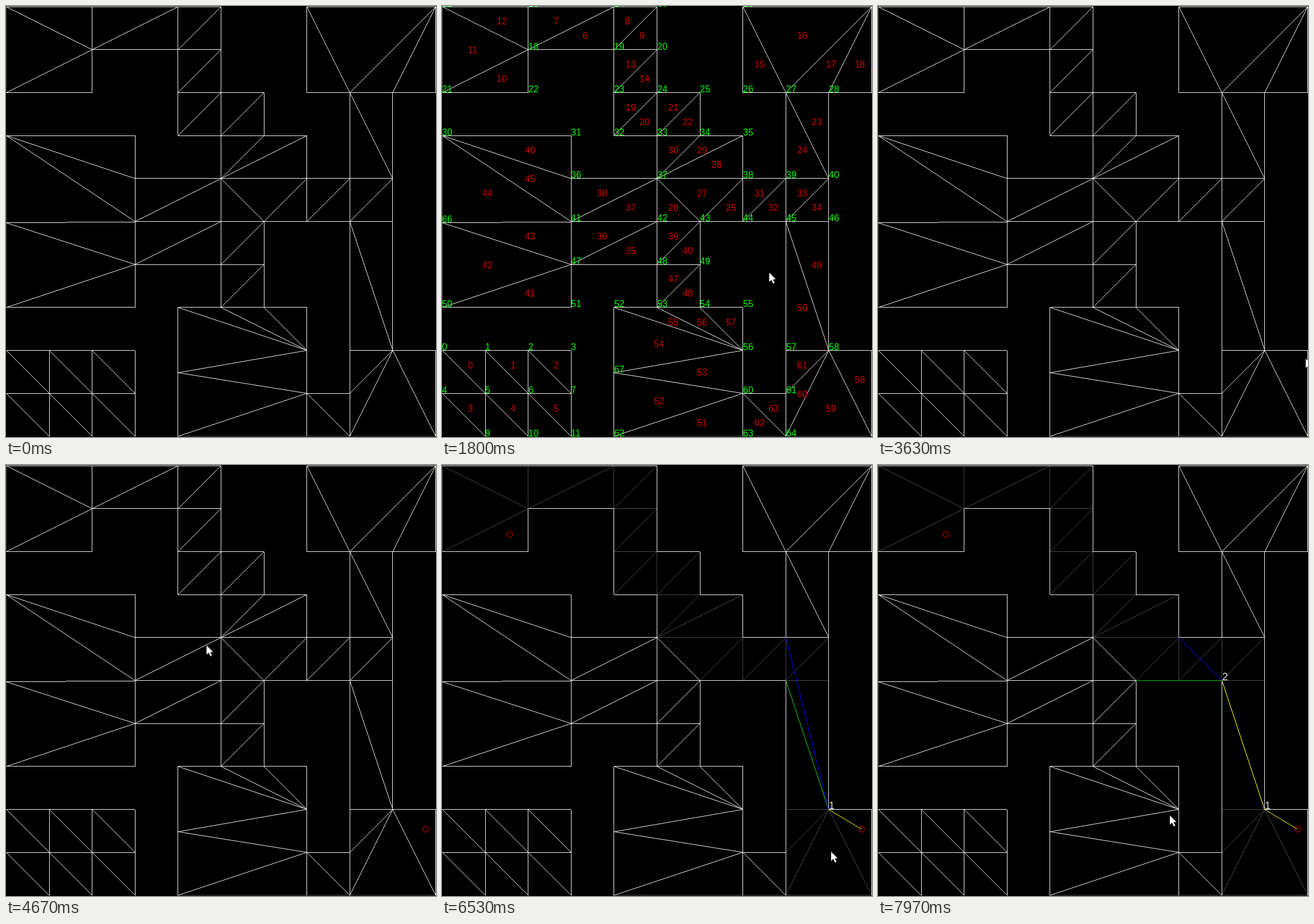
An HTML page without scripts that plays this animation: 747 by 749 pixels, repeating every 8 s.

```html
<!DOCTYPE html>
<html lang="en">
<head>
<meta charset="utf-8">
<title>Funnel path over a triangle mesh</title>
<style>
html, body { margin: 0; width: 100%; height: 100%; overflow: hidden; background: #000; }
svg { display: block; width: 100%; height: 100%; }
path { fill: none; }
.mesh path, .funnel path { stroke: #eee; vector-effect: non-scaling-stroke; }
.mesh .flat { shape-rendering: crispEdges; }
.mesh .rim { stroke: #484848; }
text { font: 16px "Liberation Sans", Arial, sans-serif; }
.node { fill: #0f0; }
.tri { fill: #d00000; }
.step { fill: #ddd; font-size: 18px; }
circle { fill: none; stroke: #f00; }
.cursor path { fill: #fff; }

.ids, .mark, .portal, .funnel path { animation: 8s step-end infinite; }
.ids { animation-name: ids; }
.mesh .portal { animation-name: dim; }
.start { animation-name: start; }
.goal { animation-name: goal; }
.one { animation-name: one; }
.two { animation-name: two; }
.funnel .left { stroke: #0c0; animation-name: left; }
.funnel .right { stroke: #00f; animation-name: right; }
.funnel .route { stroke: #ff0; animation-name: route; }
.cursor { animation: cursor 8s ease-in-out infinite; }

@keyframes ids { 0%, 38.75% { opacity: 0 } 20% { opacity: 1 } }
@keyframes dim { 0% { stroke: #eee } 63.75%, 100% { stroke: #484848 } }
@keyframes start { 0% { opacity: 0 } 50.37%, 100% { opacity: 1 } }
@keyframes goal { 0% { opacity: 0 } 63.75%, 100% { opacity: 1 } }
@keyframes one { 0% { opacity: 0 } 74.12%, 100% { opacity: 1 } }
@keyframes two { 0% { opacity: 0 } 82.12%, 100% { opacity: 1 } }
@keyframes left {
  0%, 74.12%, 82.12% { d: path("M0 0") }
  63.75% { d: path("M729 633L747 748") }
  66.25% { d: path("M729 633L597.5 748") }
  68.7% { d: path("M729 633L597.5 673.5") }
  71.25% { d: path("M729 633L597.5 598.5") }
  76.62% { d: path("M671.5 598.5L597.5 374.5") }
  84.12% { d: path("M597.5 374.5L522.5 374.5") }
  99.6%, 100% { d: path("M597.5 374.5L448 374.5") }
}
@keyframes right {
  0%, 74.12%, 82.12% { d: path("M0 0") }
  63.75% { d: path("M729 633L671.5 598.5") }
  79.12% { d: path("M671.5 598.5L671.5 299.5") }
  81.6% { d: path("M671.5 598.5L597.5 299.5") }
  89.12%, 100% { d: path("M597.5 374.5L522.5 299.5") }
}
@keyframes route {
  0% { d: path("M0 0") }
  74.12% { d: path("M729 633L671.5 598.5") }
  82.12%, 100% { d: path("M729 633L671.5 598.5L597.5 374.5") }
}
@keyframes cursor {
  0%, 15.34% { transform: translate(-40px, -40px) }
  15.35% { transform: translate(460px, 38px) }
  24.4%, 35% { transform: translate(579px, 505px) }
  45%, 46.6% { transform: translate(743px, 613px) }
  47.4% { transform: translate(742px, 606px) }
  48.4%, 53.4% { transform: translate(731px, 632px) }
  62.1%, 70% { transform: translate(118.5px, 122px) }
  73.75% { transform: translate(125px, 132px) }
  79.1%, 89.1% { transform: translate(676px, 672px) }
  99.1%, 100% { transform: translate(507px, 609px) }
}
</style>
</head>
<body>
<svg viewBox="0 0 747 749">
  <!-- Mesh in cell units -->
  <g class="mesh" transform="translate(.5 1.3) scale(74.6 74.65)">
    <path class="flat rim" d="M0 0V2M0 3V7M4 10H10"/>
    <path class="flat portal" d="M2 0V1M4 0V1H5M4 2H5V3H6M5 4H7V5M8 4V5H9M8 8H9"/>
    <path class="portal" d="M0 0L2 1L0 2M2 1L4 0M4 1L5 0M4 2L5 1M4 3L5 2M5 3L6 2M5 4L6 3M5 4L7 3M6 5L7 4M7 5L8 4M8 5L9 4M8 5L9 8M8 9L9 8L8 10M9 8L10 10"/>
    <path class="flat" d="M0 0H5M7 0H10M2 1H4M0 2H2M5 2H6M7 2H10M0 3H3M4 3H5M6 3H7M3 4H5M7 4H9M3 5H8M3 6H6M0 7H3M4 7H7M0 8H3M9 8H10M0 9H3M7 9H8"/>
    <path class="flat" d="M2 1V2M1 8V10M2 8V10M3 3V7M3 8V10M4 1V3M4 7V10M5 0V2M5 3V7M6 2V3M6 5V7M7 0V2M7 3V4M7 7V10M8 2V4M8 5V10M9 2V8M10 0V2M10 8V10"/>
    <path class="flat" d="M0 5.03H1.39M1.39 5.01H3"/>
    <path d="M0 3L3 4M0 3L3 5L5 4L6 5M0 5.03L3 6L0 7M3 6L5 5M5 6L6 5M5 7L6 6M4 7L7 8L5 7M6 7L7 8L4 8.52L7 9L4 10M7 9L8 10M7 0L8 2L10 0L9 2M8 2L9 4M0 8L2 10M1 8L3 10M2 8L3 9M0 9L1 10"/>
  </g>

  <g class="ids">
    <g class="tri">
      <text y="32"><tspan x="95">12</tspan><tspan x="194">7</tspan><tspan x="318">8</tspan></text>
      <text y="57"><tspan x="244">6</tspan><tspan x="343">9</tspan><tspan x="617">16</tspan></text>
      <text y="82" x="45">11</text>
      <text y="107"><tspan x="319">13</tspan><tspan x="543">15</tspan><tspan x="667">17</tspan><tspan x="717">18</tspan></text>
      <text y="132"><tspan x="95">10</tspan><tspan x="343">14</tspan></text>
      <text y="182"><tspan x="319">19</tspan><tspan x="393">21</tspan></text>
      <text y="207"><tspan x="343">20</tspan><tspan x="418">22</tspan><tspan x="642">23</tspan></text>
      <text y="256"><tspan x="144">46</tspan><tspan x="393">30</tspan><tspan x="443">29</tspan><tspan x="617">24</tspan></text>
      <text y="281" x="468">28</text>
      <text y="306" x="144">45</text>
      <text y="331"><tspan x="70">44</tspan><tspan x="269">38</tspan><tspan x="443">27</tspan><tspan x="543">31</tspan><tspan x="617">33</tspan></text>
      <text y="356"><tspan x="319">37</tspan><tspan x="393">26</tspan><tspan x="493">25</tspan><tspan x="567">32</tspan><tspan x="642">34</tspan></text>
      <text y="406"><tspan x="144">43</tspan><tspan x="269">36</tspan><tspan x="393">39</tspan></text>
      <text y="431"><tspan x="319">35</tspan><tspan x="418">40</tspan></text>
      <text y="456"><tspan x="70">42</tspan><tspan x="642">49</tspan></text>
      <text y="480" x="393">47</text>
      <text y="505"><tspan x="144">41</tspan><tspan x="418">48</tspan></text>
      <text y="530" x="617">50</text>
      <text y="555"><tspan x="393">55</tspan><tspan x="443">56</tspan><tspan x="493">57</tspan></text>
      <text y="593" x="368">54</text>
      <text y="630"><tspan x="45">0</tspan><tspan x="119">1</tspan><tspan x="194">2</tspan><tspan x="617">61</tspan></text>
      <text y="642" x="443">53</text>
      <text y="655" x="717">58</text>
      <text y="680" x="617">60</text>
      <text y="692" x="368">52</text>
      <text y="705"><tspan x="45">3</tspan><tspan x="119">4</tspan><tspan x="194">5</tspan><tspan x="567">63</tspan><tspan x="667">59</tspan></text>
      <text y="730"><tspan x="443">51</tspan><tspan x="543">62</tspan></text>
    </g>
    <g class="node">
      <text y="1"><tspan x="0">12</tspan><tspan x="150">13</tspan><tspan x="299">14</tspan><tspan x="374">15</tspan><tspan x="523">16</tspan></text>
      <text y="76"><tspan x="150">18</tspan><tspan x="299">19</tspan><tspan x="374">20</tspan></text>
      <text y="150"><tspan x="0">21</tspan><tspan x="150">22</tspan><tspan x="299">23</tspan><tspan x="374">24</tspan><tspan x="448">25</tspan><tspan x="523">26</tspan><tspan x="598">27</tspan><tspan x="672">28</tspan></text>
      <text y="225"><tspan x="0">30</tspan><tspan x="224">31</tspan><tspan x="299">32</tspan><tspan x="374">33</tspan><tspan x="448">34</tspan><tspan x="523">35</tspan></text>
      <text y="299"><tspan x="224">36</tspan><tspan x="374">37</tspan><tspan x="523">38</tspan><tspan x="598">39</tspan><tspan x="672">40</tspan></text>
      <text y="374"><tspan x="0" dy="2">66</tspan><tspan x="224" dy="-2">41</tspan><tspan x="374">42</tspan><tspan x="448">43</tspan><tspan x="523">44</tspan><tspan x="598">45</tspan><tspan x="672">46</tspan></text>
      <text y="449"><tspan x="224">47</tspan><tspan x="374">48</tspan><tspan x="448">49</tspan></text>
      <text y="523"><tspan x="0">50</tspan><tspan x="224">51</tspan><tspan x="299">52</tspan><tspan x="374">53</tspan><tspan x="448">54</tspan><tspan x="523">55</tspan></text>
      <text y="598"><tspan x="0">0</tspan><tspan x="75">1</tspan><tspan x="150">2</tspan><tspan x="224">3</tspan><tspan x="523">56</tspan><tspan x="598">57</tspan><tspan x="672">58</tspan></text>
      <text y="637" x="299">67</text>
      <text y="673"><tspan x="0">4</tspan><tspan x="75">5</tspan><tspan x="150">6</tspan><tspan x="224">7</tspan><tspan x="523">60</tspan><tspan x="598">61</tspan></text>
      <text y="748"><tspan x="75">9</tspan><tspan x="150">10</tspan><tspan x="224">11</tspan><tspan x="299">62</tspan><tspan x="523">63</tspan><tspan x="598">64</tspan></text>
    </g>
  </g>

  <g class="funnel">
    <path class="route"/>
    <path class="left"/>
    <path class="right"/>
  </g>
  <text class="step mark one" x="672" y="598">1</text>
  <text class="step mark two" x="598" y="374">2</text>
  <circle class="mark start" cx="729" cy="633" r="5"/>
  <circle class="mark goal" cx="118" cy="121" r="5"/>

  <g class="cursor"><path d="M0 0V16L3.8 12.6L6.8 19L9.4 18L6.5 11.5H11.5Z"/></g>
</svg>
</body>
</html>
```
